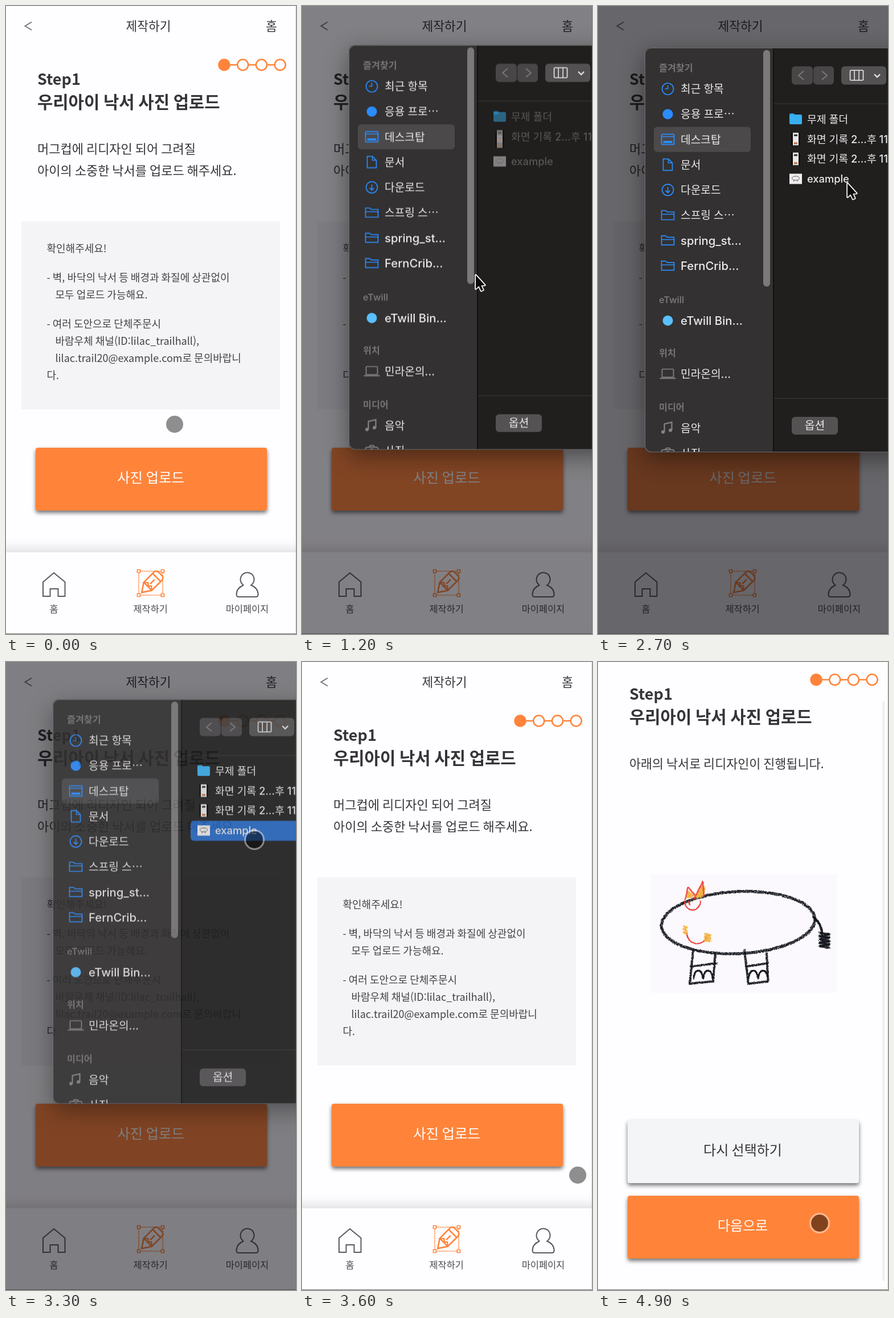
Recreate the animation shown at these times as an HTML page with a canvas. Size 509 px wide and 1099 px high, loop 5000 ms.

```html
<!DOCTYPE html>
<html lang="ko">
<head>
<meta charset="utf-8">
<style>
html, body { margin: 0; width: 100%; height: 100%; overflow: hidden; background: #fefdff; }
canvas { display: block; width: 509px; height: 1099px; }
</style>
</head>
<body>
<canvas id="stage" width="509" height="1099"></canvas>
<script>
const W = 509, H = 1099, LOOP = 5000, STEP = 100;
const KO = '"Noto Sans CJK KR", "Noto Sans CJK", sans-serif';
const UI = 'Inter, "Noto Sans CJK KR", "Noto Sans CJK", sans-serif';
const ORANGE = '#ff843a', PAPER = '#fefdff', INK = '#363436';
const BLUE = '#2a8cff', GRAY = '#858384', LIGHT = '#eceaeb', RULE = '#3a3938';
const stage = document.getElementById('stage').getContext('2d');
let g = stage;

function layer() {
  const c = document.createElement('canvas');
  c.width = W; c.height = H;
  return c.getContext('2d');
}

/* ---------- timing ---------- */

const ramp = (t, a, b) => Math.max(0, Math.min(1, (t - a) / (b - a)));
const smooth = p => p * p * (3 - 2 * p);
const easeIn = p => p * p;
const easeOut = p => 1 - (1 - p) * (1 - p);
const mix = (a, b, p) => a + (b - a) * p;

/* ---------- drawing helpers ---------- */

// cy is the optical middle of the line
function text(s, x, cy, size, { weight = 400, font = KO, align = 'left', color = INK } = {}) {
  g.font = `${weight} ${size}px ${font}`;
  g.textAlign = align;
  g.fillStyle = color;
  g.fillText(s, x, cy + size * 0.37);
}

function paint(fill, color, width) {
  if (fill) { g.fillStyle = fill; g.fill(); }
  if (width) { g.strokeStyle = color; g.lineWidth = width; g.stroke(); }
}

function box(x, y, w, h, r, fill, color, width) {
  g.beginPath();
  g.roundRect(x, y, w, h, r);
  paint(fill, color, width);
}

function ring(x, y, r, fill, color, width) {
  g.beginPath();
  g.arc(x, y, r, 0, 7);
  paint(fill, color, width);
}

function line(pts, color, width, closed, fill) {
  g.beginPath();
  for (let i = 0; i < pts.length; i += 2) g.lineTo(pts[i], pts[i + 1]);
  if (closed) g.closePath();
  paint(fill, color, width);
}

function shadow(color, blur, dy) {
  g.shadowColor = color; g.shadowBlur = blur; g.shadowOffsetY = dy;
}

function button(label, y, size, fill, color) {
  g.save();
  shadow('rgba(0,0,0,.55)', 7, 4);
  box(52, y, 406, 110, 4, fill);
  g.restore();
  text(label, 254, y + 52, size, { weight: 500, align: 'center', color });
}

/* ---------- pages ---------- */

function header() {
  line([45, 28, 33.5, 35, 45, 42], '#777577', 2);
  text('제작하기', 250, 35, 21.5, { align: 'center' });
  text('홈', 466, 35, 21.5, { align: 'center' });
  line([383, 103, 481, 103], ORANGE, 2.5);
  for (let i = 0; i < 4; i++) ring(383 + 32.7 * i, 103, 9.5, i ? PAPER : ORANGE, ORANGE, 2.5);
  text('Step1', 55, 128, 27, { weight: 700 });
  text('우리아이 낙서 사진 업로드', 55, 168, 29.7, { weight: 700 });
}

function pencilIcon() {
  g.setLineDash([2, 1]);
  box(233, 989, 42, 42, 0, '', ORANGE, 1.6);
  g.setLineDash([]);
  for (const x of [233, 275]) for (const y of [989, 1031]) box(x - 2.5, y - 2.5, 5, 5, 0, PAPER, ORANGE, 1.6);
  g.save();
  g.translate(254.5, 1010);
  g.rotate(-Math.PI / 4);
  box(-8, -10, 31, 20, [0, 6, 6, 0], '', ORANGE, 2.6);
  line([-8, -10, -23, 0, -8, 10], ORANGE, 2.6);
  line([-8, -10, -3, -4, -7, 0, -3, 4, -8, 10], ORANGE, 2.2);
  line([14, -10, 14, 10], ORANGE, 2.6);
  line([-2, 0, 9, 0], ORANGE, 2.4);
  g.restore();
}

function personIcon(x, y, color) {
  g.beginPath();
  g.arc(x, y - 8.5, 12, 2.15, 0.99);
  g.bezierCurveTo(x + 15, y + 5, x + 19, y + 11, x + 19, y + 18);
  g.quadraticCurveTo(x + 19, y + 22, x + 15, y + 22);
  g.lineTo(x - 15, y + 22);
  g.quadraticCurveTo(x - 19, y + 22, x - 19, y + 18);
  g.bezierCurveTo(x - 19, y + 11, x - 15, y + 5, x - 6.5, y + 1.5);
  paint('', color, 2);
}

function tabBar() {
  g.save();
  shadow('rgba(0,0,0,.16)', 22, -3);
  box(-20, 956, W + 40, 180, 0, PAPER);
  g.restore();
  const c = '#5c5a5d';
  line([65, 1008, 84, 992, 103.5, 1008, 103.5, 1033, 91.5, 1033, 91.5, 1020, 77.5, 1020, 77.5, 1033, 65, 1033], c, 2, true);
  pencilIcon();
  personIcon(423.5, 1012, c);
  ['홈', '제작하기', '마이페이지'].forEach((s, i) =>
    text(s, 84 + 169.7 * i, 1054.5, 16.4, { align: 'center', color: '#4a484b' }));
}

function uploadPage() {
  header();
  text('머그컵에 리디자인 되어 그려질', 55, 250, 22);
  text('아이의 소중한 낙서를 업로드 해주세요.', 55, 288, 22);
  box(27, 377, 454, 329, 0, '#f4f3f6');
  const color = '#444245';
  text('확인해주세요!', 71.5, 424, 18, { weight: 500, color });
  const note = (y, ...rows) => rows.forEach((s, i) =>
    text(s, i % 3 ? 86.5 : 71.5, y + 30 * i, 18, { color }));
  note(475.5, '- 벽, 바닥의 낙서 등 배경과 화질에 상관없이', '모두 업로드 가능해요.');
  note(556.5, '- 여러 도안으로 단체주문시', '바람우체 채널(ID:lilac_trailhall),',
    'lilac.trail20@example.com로 문의바랍니', '다.');
  button('사진 업로드', 773, 24.4, ORANGE, '#fff');
  tabBar();
}

/* ---------- crayon drawing ---------- */

let seed = 7;
function rnd() {
  seed = (seed * 16807) % 2147483647;
  return seed / 2147483647 - 0.5;
}

// Scatters specks of wax along a polyline
function crayon(color, w, p) {
  g.fillStyle = color;
  for (let i = 0; i + 3 < p.length; i += 2) {
    const len = Math.hypot(p[i + 2] - p[i], p[i + 3] - p[i + 1]);
    for (let s = 0; s < len; s += 0.8) {
      const x = mix(p[i], p[i + 2], s / len), y = mix(p[i + 1], p[i + 3], s / len);
      for (let k = 0; k < w * 1.3; k++) {
        g.globalAlpha = 0.75 + rnd() * 0.5;
        g.fillRect(x + rnd() * w - 0.6, y + rnd() * w - 0.6, 1.2, 1.2);
      }
    }
  }
  g.globalAlpha = 1;
}

function arc(x, y, rx, ry, from, to, tilt = 0) {
  const pts = [];
  for (let i = 0; i <= 32; i++) {
    const a = mix(from, to, i / 32) * Math.PI, dx = rx * Math.cos(a);
    pts.push(x + dx, y + ry * Math.sin(a) + tilt * dx);
  }
  return pts;
}

function zigzag(x, y, w, h, n) {
  const pts = [];
  for (let i = 0; i <= n; i++) pts.push(x + (i % 2 ? w : 0), y + h * i / n);
  return pts;
}

function drawDoodle() {
  const black = '#15171e', red = '#f0403c', gold = '#f5b545';
  box(92, 416, 328, 207, 0, '#fbf9fd');
  crayon(black, 4.6, arc(246, 500, 135, 54.5, 0, 2, -0.04));
  crayon(black, 3.4, arc(362, 520, 31, 34, -0.33, 0));
  crayon(black, 4, zigzag(389, 518, 17, 26, 9));
  for (const [x, lean] of [[167, -6], [257, 7]]) {
    crayon(black, 3.4, [x, 548, x + lean, 607, x + 38 + lean / 2, 603, x + 39, 553]);
    crayon(black, 3.2, [x + lean / 2 - 1, 577, x + 42, 571]);
    for (const toe of [12, 29]) crayon(black, 2.4, arc(x + lean / 2 + toe, 598, 8, 14, 1, 2));
  }
  for (const [x, tip, y] of [[153, 158, 438], [168, 184, 428]]) {
    crayon(gold, 5, [x + 5, 456, tip, y + 9, x + 9, 455, tip + 2, y + 12, x + 14, 454]);
    crayon(red, 2.2, [x, 460, tip, y, x + 18, 453]);
  }
  crayon(red, 1.6, arc(166, 462, 14, 16, 0, 1));
  crayon(red, 2.6, [159, 463, 161, 469]);
  crayon(red, 1.6, arc(174, 518, 18, 19, 0.12, 1));
  crayon(gold, 2.6, zigzag(150, 506, 6, 14, 5));
  crayon(gold, 4, zigzag(188, 520, 9, 13, 5));
}

const doodle = g = layer();
drawDoodle();
g = stage;

function resultPage(t) {
  const y = Math.round(72 * smooth(ramp(t, 4200, 4670)));
  g.save();
  g.translate(0, -y);
  header();
  text('아래의 낙서로 리디자인이 진행됩니다.', 55, 250, 21.8);
  g.drawImage(doodle.canvas, 0, 28);
  button('다시 선택하기', 874, 24, '#f3f5f7', INK);
  button('다음으로', 1006, 24, ORANGE, '#fff');
  g.restore();
  g.globalAlpha = ramp(t, 4200, 4400) - 0.64 * ramp(t, 4500, 4800);
  box(499, 2.5 + 0.915 * y, 4, 1015, 2, '#d5d3d8');
  g.globalAlpha = 1;
}

/* ---------- file dialog ---------- */

const icons = {
  clock(x, y) { ring(x, y, 10, '', BLUE, 1.7); line([x, y - 6, x, y, x - 5, y], BLUE, 1.7); },
  dot(x, y) { ring(x, y, 9, BLUE); },
  desktop(x, y) {
    box(x - 11, y - 9, 22, 18, 2, '', BLUE, 1.8);
    line([x - 11, y - 5, x + 11, y - 5], BLUE, 1.5);
    box(x - 8, y + 2.5, 16, 4, 1, BLUE);
  },
  page(x, y) {
    line([x - 8, y - 10, x + 1, y - 10, x + 8, y - 3, x + 8, y + 10, x - 8, y + 10], BLUE, 1.7, true);
    line([x + 1, y - 10, x + 1, y - 3, x + 8, y - 3], BLUE, 1.5);
  },
  download(x, y) {
    ring(x, y, 10, '', BLUE, 1.7);
    line([x, y - 5, x, y + 5], BLUE, 1.7);
    line([x - 4, y + 1, x, y + 5, x + 4, y + 1], BLUE, 1.7);
  },
  folder(x, y) {
    line([x - 11, y + 8, x - 11, y - 8, x - 4, y - 8, x - 1, y - 5.5, x + 11, y - 5.5, x + 11, y + 8], BLUE, 1.7, true);
    line([x - 11, y - 1.5, x + 11, y - 1.5], BLUE, 1.5);
  },
  drive(x, y) { ring(x, y, 9, '#5ac0ff'); },
  laptop(x, y) {
    box(x - 10, y - 8, 20, 14, 1, '', GRAY, 1.7);
    line([x - 14, y + 8, x + 14, y + 8], GRAY, 2);
  },
  music(x, y) {
    line([x - 6, y + 7, x - 6, y - 7, x + 7, y - 10, x + 7, y + 4], GRAY, 2.2);
    ring(x - 8.5, y + 7, 3, GRAY);
    ring(x + 4.5, y + 4, 3, GRAY);
  },
  camera(x, y) {
    box(x - 11, y - 6, 22, 16, 3, '', GRAY, 1.7);
    line([x - 5, y - 6, x - 3, y - 9, x + 3, y - 9, x + 5, y - 6], GRAY, 1.7);
    ring(x, y + 2, 5, '', GRAY, 1.7);
  }
};

const sections = [
  [108.5, '즐겨찾기', ['clock', '최근 항목'], ['dot', '응용 프로⋯'], ['desktop', '데스크탑'], ['page', '문서'],
    ['download', '다운로드'], ['folder', '스프링 스⋯'], ['folder', 'spring_st...'], ['folder', 'FernCrib...']],
  [514, 'eTwill', ['drive', 'eTwill Bin...']],
  [607, '위치', ['laptop', '민라온의...']],
  [702, '미디어', ['music', '음악'], ['camera', '사진']]
];

function sidebar() {
  box(98, 211.5, 170, 44, 6, '#4b494a');
  for (const [top, title, ...items] of sections) {
    text(title, 107, top, 16.2, { font: UI, weight: 600, color: '#777475' });
    items.forEach(([icon, label], i) => {
      const y = top + 36.5 + 44.2 * i;
      icons[icon](122.5, y);
      text(label, 145, y, /^[a-z]/i.test(label) ? 20.3 : 19.2, { font: UI, weight: 500, color: LIGHT });
    });
  }
  box(290, 77, 12, 414, 6, '#7b797a');
}

function phoneThumb(y) {
  box(339, y - 11, 16, 22, 1, '#0c0c0c');
  box(342, y - 11, 10, 22, 0, '#e9e7e8');
  box(344, y - 8, 6, 3, 0, '#2c2b2c');
  box(344, y + 6, 6, 3, 0, '#c0703c');
}

function fileList(t) {
  const grow = smooth(ramp(t, 1100, 1400));
  const fade = mix(0.28, 1, smooth(ramp(t, 1200, 1500)));
  const row = i => 198 + 34.8 * i;
  const last = row(2 + grow);
  const name = (s, y) => text(s, 367, y, 18.3, { font: UI, weight: 500, color: LIGHT });
  const clip = '화면 기록 2...후 11';
  if (t >= 3100) box(324, last - 17, 240, 35, 6, '#2869c4');
  g.globalAlpha = fade;
  name('무제 폴더', row(0));
  name(clip, row(1));
  if (grow === 1) name(clip, row(2));
  name('example', last);
  g.globalAlpha = Math.min(1, fade + 0.2);
  box(336, 188, 9, 6, 2, '#2b9bdc');
  box(336, 190, 22, 17, 2, '#38b0ef');
  if (grow) phoneThumb(row(1 + grow));
  phoneThumb(row(1));
  box(336, last - 9, 22, 18, 0, '#efedee');
  line(arc(347, last - 1, 6.5, 3.5, 0, 2), '#555', 1);
  for (const x of [344, 350]) line([x, last + 2, x, last + 5], '#555', 1);
  g.globalAlpha = 1;
}

function toolbar() {
  box(340, 105.5, 37, 32, 6, '#484647');
  box(378, 105.5, 36, 32, 6, '#484647');
  box(427, 105.5, 79, 32, 6, '#535152');
  line([361, 114, 352, 121.5, 361, 129], '#7c7a7b', 1.8);
  line([393, 114, 402, 121.5, 393, 129], '#7c7a7b', 1.8);
  box(442.5, 112.5, 23, 17.5, 2, '', LIGHT, 1.6);
  for (const x of [450, 458]) line([x, 113, x, 130], LIGHT, 1.5);
  line([485, 119.5, 490, 124.5, 495, 119.5], LIGHT, 2.2);
}

const sheet = layer();
const frame = () => g.roundRect(82, 73, 600, 708, 11);

function drawSheet(t) {
  g = sheet;
  g.clearRect(0, 0, W, H);
  g.save();
  g.beginPath();
  frame();
  g.clip();
  g.fillStyle = '#201f1e';
  g.fill();
  box(82, 73, 226, 708, 0, '#333131');
  sidebar();
  line([308, 73, 308, 781], '#0a0a0a', 1.5);
  for (const y of [171, 686.5]) line([309, y, W, y], RULE, 1.2);
  toolbar();
  fileList(t);
  box(340, 719, 81, 31, 6, '#555254');
  text('옵션', 380.5, 734, 19.3, { font: UI, weight: 500, align: 'center', color: LIGHT });
  g.restore();
  box(82.5, 73.5, 600, 707, 11, '', '#6c6a6b', 1.2);
  g = stage;
}

function dialog(t) {
  const open = easeOut(ramp(t, 850, 1450)), close = easeIn(ramp(t, 3100, 3600));
  const shown = open * (1 - close);
  if (!shown) return;
  g.fillStyle = `rgba(12,10,16,${0.62 * shown})`;
  g.fillRect(0, 0, W, H);
  drawSheet(t);
  g.save();
  g.globalAlpha = Math.min(1, open * 1.25) * (1 - close);
  g.translate(0, -26 * (1 - open) - 48 * close);
  // Shadow only outside the panel, so it stays clear while fading
  g.save();
  g.beginPath();
  g.rect(0, -100, W, H + 200);
  frame();
  g.clip('evenodd');
  shadow('rgba(0,0,0,.42)', 40, 12);
  box(82, 73, 600, 708, 11, '#000');
  g.restore();
  g.drawImage(sheet.canvas, 0, 0);
  g.restore();
}

/* ---------- pointer ---------- */

const stops = [[0, 296, 732], [600, 305, 826], [1000, 305, 826], [1200, 304, 469], [2500, 437, 308],
  [3400, 436, 311], [3600, 484, 898], [4400, 432, 771], [4900, 389, 982]];
const presses = [700, 3300, 4900];

function pointer(t) {
  const i = Math.max(1, stops.findIndex(s => s[0] >= t));
  const [a, b] = [stops[i - 1], stops[i]];
  const p = smooth(ramp(t, a[0], b[0]));
  const x = mix(a[1], b[1], p), y = mix(a[2], b[2], p);
  if (t >= 1000 && t < 3300) {
    g.save();
    g.translate(x + 1, y + 2);
    g.lineJoin = 'round';
    line([0, 0, 0, 24, 5.5, 19, 9.5, 27.5, 13, 26, 9.3, 18, 16, 17.5], '#fff', 3.4, true);
    paint('#0b0b0b');
    g.restore();
    return;
  }
  const pressed = presses.some(s => t >= s && t < s + 200);
  ring(x, y, 15, `rgba(0,0,0,${pressed ? 0.5 : 0.44})`);
  if (pressed) ring(x, y, 16.5, '', 'rgba(255,255,255,.42)', 3);
}

function draw(t) {
  box(0, 0, W, H, 0, PAPER);
  if (t < 3800) uploadPage(); else resultPage(t);
  dialog(t);
  box(508, 0, 1, H, 0, 'rgba(80,78,82,.18)');
  box(0, 1098, W, 1, 0, 'rgba(60,58,62,.7)');
  pointer(t);
}

const start = performance.now();
let last = -1;
function tick() {
  const t = Math.floor(((performance.now() - start) % LOOP) / STEP) * STEP;
  if (t !== last) draw(last = t);
  requestAnimationFrame(tick);
}
tick();
</script>
</body>
</html>
```
